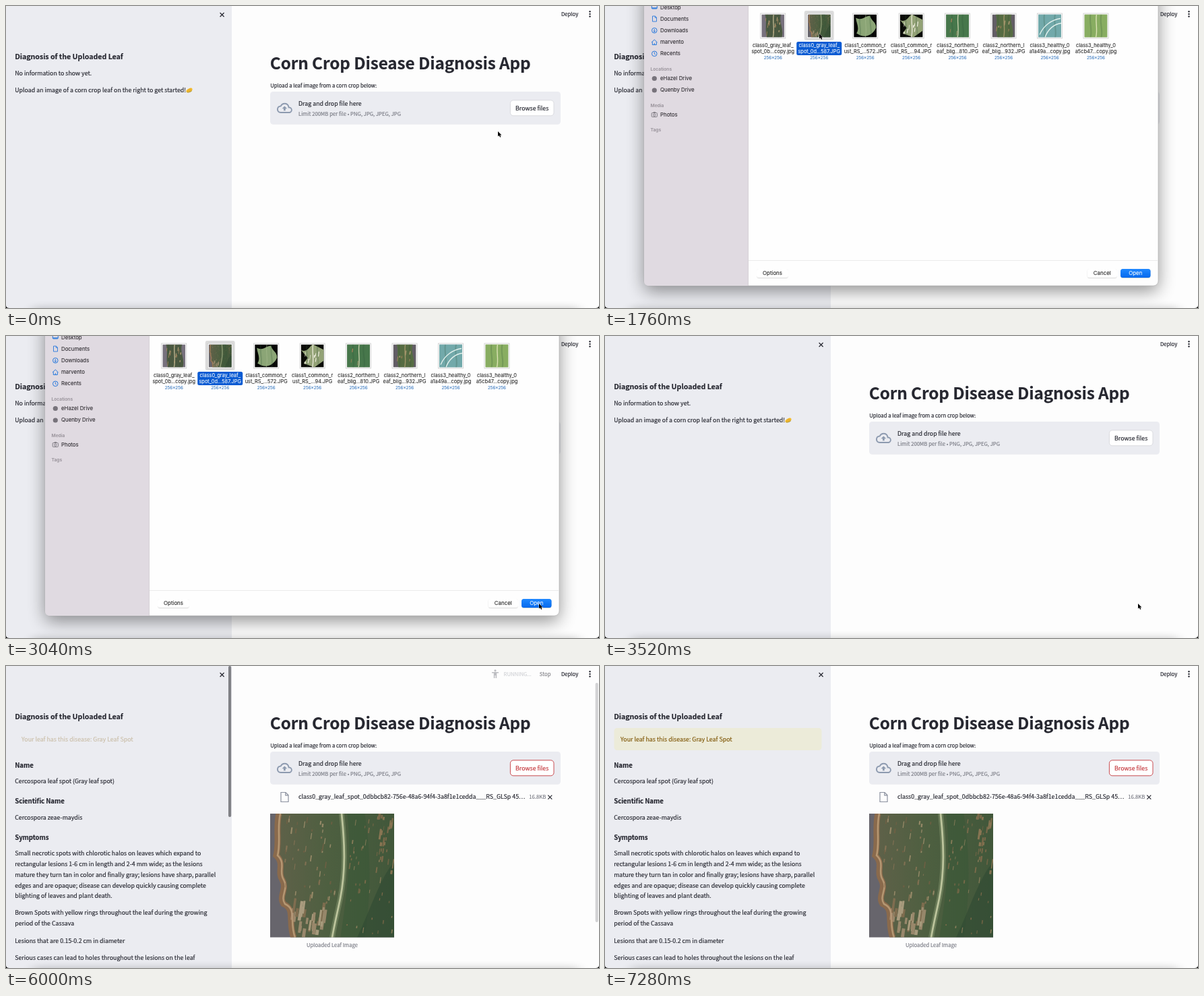
An HTML page that plays this animation: 880x448 px, repeating every 7360 ms.

```html
<!DOCTYPE html>
<html lang="en">
<head>
<meta charset="utf-8">
<title>Crop diagnosis demo</title>
<style>
html, body { margin: 0; width: 100%; height: 100%; overflow: hidden; background: #fdfdfd; }
svg { display: block; }
text {
  font-family: "Noto Sans CJK JP", "Noto Sans CJK SC", "Noto Sans CJK", "Open Sans", sans-serif;
  white-space: pre; fill: currentColor; stroke: currentColor; stroke-width: .18;
}
#dialog text { font-family: Inter, Roboto, sans-serif; stroke-width: .08; }
.line { fill: none; stroke-width: 1; }
</style>
</head>
<body>
<script>
const INK = '#262730', RED = '#c4383d', BODY = 8.84, SMALL = 7.72, LOOP = 7360;

const text = (x, y, size, str, color = INK, more = '') =>
  `<text x="${x}" y="${y}" font-size="${size}" color="${color}" ${more}>${str}</text>`;
const bold = (x, y, size, str) =>
  text(x, y, size, str, INK, 'font-weight="700" letter-spacing="-.005em"');
const rect = (x, y, w, h, fill, r = 0, more = '') =>
  `<rect x="${x}" y="${y}" width="${w}" height="${h}" rx="${r}" fill="${fill}" ${more}/>`;
const path = (d, stroke, width = 1, fill = 'none', more = '') =>
  `<path d="${d}" stroke="${stroke}" stroke-width="${width}" fill="${fill}" ${more}/>`;
const group = (id, body) => `<g id="${id}">${body}</g>`;
const cross = (x, y, r) => path(`M${x - r} ${y - r}l${2 * r} ${2 * r}m0 ${-2 * r}l${-2 * r} ${2 * r}`, INK, 1.2);

function random(seed) {
  return () => (seed = seed * 16807 % 2147483647) / 2147483647;
}

// Short slanted lesions scattered over a box
function spots(seed, count, x, y, w, h, size, colors) {
  const rnd = random(seed);
  let out = '';
  for (let i = 0; i < count; i++) {
    const px = x + rnd() * w, py = y + rnd() * h, len = size * (.3 + rnd());
    out += path(`M${px.toFixed(1)} ${py.toFixed(1)}l${(len * .14).toFixed(1)} ${(-len).toFixed(1)}`,
      colors[i % colors.length], (size * (.12 + rnd() * .16)).toFixed(1));
  }
  return out;
}

function photo() {
  const edge = 'M13 0C8 20 14 42 9 62C22 74 10 86 18 98C26 112 12 122 20 134C38 142 26 160 35 184';
  const rib = 'M106 0C111 46 112 86 104 126C99 150 95 166 92 184';
  return rect(0, 0, 184, 184, '#67656c') + '<g filter="url(#blur)">' +
    path(edge + 'H186V0Z', 'none', 0, 'url(#leaf)') +
    path('M114 -2C122 60 114 120 104 186H140C150 120 150 60 140 -2Z', 'none', 0, '#3a5838', 'opacity=".55"') +
    path('M128 186C150 140 165 90 186 70V186Z', 'none', 0, '#2f4a32', 'opacity=".6"') +
    path(edge, '#8a6a4c', 9) + path(edge, '#b59772', 2.5, 'none', 'transform="translate(2 0)"') +
    '<g opacity=".72">' +
    spots(71, 34, 32, 144, 48, 40, 18, ['#b3977a', '#8f7254', '#c9b394']) +
    spots(19, 50, 22, 10, 74, 125, 8, ['#94795a', '#b09a76', '#766044']) +
    spots(45, 46, 114, 8, 68, 172, 7, ['#927250', '#a58b66', '#7d6848']) +
    spots(8, 20, 160, 4, 22, 90, 13, ['#a3805c', '#907050']) + '</g>' +
    path(rib, '#7c8d66', 8, 'none', 'opacity=".6"') + path(rib, '#bcc49c', 2.8) + '</g>';
}

// [background, leaf colour, leaf outline, rib colour, lesion count]
const blob = 'M3 5C12 10 17 2 24 2C26 10 34 12 33 20C27 32 16 36 4 28C9 20 4 14 3 5Z';
const full = 'M0 0H34V34H0Z';
const band = 'M5 0H29C25 12 34 22 30 34H8C4 22 9 10 5 0Z';
const looks = [
  ['#77717d', '#4b5941', band, '#b7b08c', 12],
  null,
  ['#050605', '#8ba576', blob, '#a9bc91', 0],
  ['#0b0c08', '#93a276', 'M0 8C10 14 14 0 18 0L34 8V24L20 34L4 28L10 20Z', '#e5e5d2', 9],
  ['#6b7f62', '#47774b', full, '#c6cfaa', 3],
  ['#625d65', '#566c43', band, '#9f9569', 6],
  ['#4b8795', '#72a9aa', full, '#e2f0ec', 0],
  ['#789d55', '#88ad61', full, '#dbe3b4', 0]
];
const names = [
  'class0_gray_leaf_|spot_0b...copy.jpg', 'class0_gray_leaf_|spot_0d...587.JPG',
  'class1_common_r|ust_RS_...572.JPG', 'class1_common_r|ust_RS_...94.JPG',
  'class2_northern_l|eaf_blig...810.JPG', 'class2_northern_l|eaf_blig...932.JPG',
  'class3_healthy_0|a1a49a...copy.jpg', 'class3_healthy_0|a5cb47...copy.jpg'
];

function picture(i) {
  if (!looks[i]) return '<g transform="scale(.185)">' + photo() + '</g>';
  const [back, leaf, shape, rib, count] = looks[i];
  const vein = i === 6 ? 'M2 30C8 16 20 8 33 6M10 34C14 22 24 14 34 13' : 'M18 0C16 12 20 22 17 34';
  return rect(0, 0, 34, 34, back) + path(shape, 'none', 0, leaf) +
    path('M25 0C22 12 28 24 25 34M9 0C7 12 12 24 9 34', '#2c4f34', 2, 'none', 'opacity=".22"') +
    path(vein, rib, i === 2 ? .6 : 1.4) +
    spots(31 + i * 7, count, 6, 8, 22, 25, 6, i === 3 ? ['#f0eee0'] : ['#a5835c', '#b39c74']);
}

function fileItem(i) {
  const cx = 249.3 + i * 68.45, [a, b] = names[i].split('|');
  const label = color => text(cx, 60.7, 7.4, a, color, 'text-anchor="middle"') +
    text(cx, 70.4, 7.4, b, color, 'text-anchor="middle"');
  const chosen = i === 1 ? group('chosen', rect(cx - 22, 7, 44, 44, '#dcdcdc', 3) +
    rect(cx - 33.5, 53, 67, 20, '#0a5bd3', 2.5) + label('#fff')) : '';
  return label('#272727') + chosen + rect(cx - 18.5, 11, 37, 37, '#fff', 0, 'stroke="#c4c4c4" stroke-width=".7"') +
    `<svg x="${cx - 17}" y="12.5" width="34" height="34">${picture(i)}</svg>` +
    text(cx, 79.2, 6.3, '256×256', '#2f72bd', 'text-anchor="middle"');
}

function dialog() {
  const blue = '#2678dc', gray = '#77737b';
  const places = [['Desktop', 2], ['Documents', 19], ['Downloads', 36], ['marvento', 53.5], ['Recents', 70.5],
    ['eHazel Drive', 107], ['Quenby Drive', 124.5], ['Photos', 161]];
  const heads = [['Locations', 93], ['Media', 147], ['Tags', 183.5]];
  const button = (x, w, label, fill, ink) =>
    rect(x, 390, w, 13, fill, 3.5, 'filter="url(#lift)"') + text(x + w / 2, 399.3, 7.9, label, ink, 'text-anchor="middle"');
  return rect(58, -30, 763, 445, '#000', 8, 'filter="url(#shade)" opacity=".42"') +
    rect(58, -30, 763, 445, '#fefefe', 7, 'stroke="#aaa" stroke-width=".6"') +
    path('M212.5 -30V415H65Q58 415 58 408V-30Z', 'none', 0, '#e0dae1') +
    path('M212.5 0V415', '#cfc9d0', .8) + path('M213 377.5H821', '#e6e6e6', .8) +
    places.map(([s, y]) => text(82, y + 2.8, 7.85, s, '#2d2a2f')).join('') +
    heads.map(([s, y]) => text(67.5, y + 2.5, 6.7, s, '#9a949c', 'font-weight="600"')).join('') +
    rect(69.3, -2, 8, 6, 'none', 1, `stroke="${blue}"`) + path('M69.5 3H77', blue, 1.4) +
    path('M70.5 15H74.5L76.5 17V23H70.5ZM74.3 15V17.3H76.5', blue, .9) +
    `<g class="line" stroke="${blue}"><circle cx="73.3" cy="36.3" r="3.8"/><circle cx="73.3" cy="70.8" r="3.8"/></g>` +
    path('M73.3 34V38.4M71.5 36.8L73.3 38.5L75.1 36.8M73.3 68.3V71L75 72', blue, .9) +
    path('M69 54L73.3 50L77.6 54M70.3 53.5V57.5H76.3V53.5M73.3 55V57.5', blue, 1) +
    [107.5, 125].map(y => `<circle cx="73.3" cy="${y}" r="3.6" fill="${gray}"/>`).join('') +
    rect(69.2, 158.5, 8.2, 6, 'none', 1, `stroke="${gray}" stroke-width=".9"`) +
    `<circle class="line" cx="73.3" cy="161.6" r="1.6" stroke="${gray}"/>` + path('M71.7 157.7H75', gray, 1) +
    names.map((_, i) => fileItem(i)).join('') +
    button(225, 47, 'Options', '#fff', '#222') + button(715.5, 44.5, 'Cancel', '#fff', '#222') +
    button(765, 44.5, 'Open', 'url(#blue)', '#fff') +
    group('press', rect(765, 390, 44.5, 13, '#003a9c', 3.5, 'opacity=".3"'));
}

const lines = (rows, x = 13.2) => rows.map(([y, s]) => text(x, y, BODY, s)).join('');

function sidebarEmpty() {
  return lines([[102.6, 'No information to show yet.'],
    [128, 'Upload an image of a corn crop leaf on the right to get started!']]) +
    '<g transform="translate(272 125) rotate(-28)"><ellipse rx="5" ry="2.5" fill="#f3bd31"/>' +
    path('M-4.5 .5Q-1 3.8 3 2.4', '#b59b38', 1) + path('M-2 -1H3M-2 .8H3', '#d99522', .5) + '</g>';
}

function sidebarResult() {
  const alert = group('alert', rect(13.5, 92, 308, 33, '#ecebd9', 4.5, 'id="alertBack"') +
    text(23, 112, BODY, 'Your leaf has this disease: Gray Leaf Spot', '#80590a'));
  return alert + bold(13.2, 150.8, 9.65, 'Name') + bold(13.2, 204.2, 9.65, 'Scientific Name') +
    bold(13.2, 257.6, 9.65, 'Symptoms') + lines([
      [174.4, 'Cercospora leaf spot (Gray leaf spot)'],
      [228, 'Cercospora zeae-maydis'],
      [281.4, 'Small necrotic spots with chlorotic halos on leaves which expand to'],
      [297.1, 'rectangular lesions 1-6 cm in length and 2-4 mm wide; as the lesions'],
      [312.8, 'mature they turn tan in color and finally gray; lesions have sharp, parallel'],
      [328.5, 'edges and are opaque; disease can develop quickly causing complete'],
      [344.2, 'blighting of leaves and plant death.'],
      [369.4, 'Brown Spots with yellow rings throughout the leaf during the growing'],
      [385.2, 'period of the Cassava'],
      [410.8, 'Lesions that are 0.15-0.2 cm in diameter'],
      [436.3, 'Serious cases can lead to holes throughout the lesions on the leaf']
    ]);
}

function uploader() {
  const cloud = 'M19.35 10.04A7.49 7.49 0 0 0 12 4C9.11 4 6.6 5.64 5.35 8.04A6 6 0 0 0 0 14c0 3.31 2.69 6 6 6h13c2.76 0 5-2.24 5-5 0-2.64-2.05-4.78-4.65-4.96zM19 18H6a4 4 0 0 1-.44-7.97l1.07-.11.5-.95A5.47 5.47 0 0 1 17.39 10.43l.3 1.5 1.53.11A2.98 2.98 0 0 1 19 18zM8 13h2.55v3h2.9v-3H16l-4-4z';
  return bold(391.8, 94, 24.33, 'Corn Crop Disease Diagnosis App') +
    text(392.2, 120.6, SMALL, 'Upload a leaf image from a corn crop below:') +
    rect(392, 127, 431, 48.7, '#ebecf1', 4.5) +
    path(cloud, 'none', 0, '#8d9aaf', 'transform="translate(402 140) scale(.95)"') +
    text(434, 148.4, BODY, 'Drag and drop file here') +
    text(434, 163.4, SMALL, 'Limit 200MB per file • PNG, JPG, JPEG, JPG', '#7c7e87') +
    rect(748.4, 139.8, 64.6, 23, '#fff', 4.5, 'id="browse" stroke-width=".9"') +
    text(780.7, 155, BODY, 'Browse files', INK, 'id="browseText" text-anchor="middle"') +
    group('file', path('M408 187.5H415L419 191.5V201.5H408ZM414.8 187.7V191.8H419', '#8b919f', 1.2) +
      text(434, 197.4, BODY, 'class0_gray_leaf_spot_0dbbcb82-756e-48a6-94f4-3a8f1e1cedda___RS_GLSp 45…') +
      text(776.3, 197, SMALL, '16.8KB', '#7c7e87') + cross(807.3, 194.7, 3));
}

document.body.innerHTML = `<svg width="880" height="448" viewBox="0 0 880 448"><defs>
  <linearGradient id="leaf"><stop stop-color="#5f6149"/><stop offset=".45" stop-color="#4d5f40"/><stop offset="1" stop-color="#41573a"/></linearGradient>
  <linearGradient id="blue" x2="0" y2="1"><stop stop-color="#2389ff"/><stop offset="1" stop-color="#0069ed"/></linearGradient>
  <filter id="shade" x="-10%" y="-10%" width="120%" height="125%"><feOffset dy="8"/><feGaussianBlur stdDeviation="13"/></filter>
  <filter id="soft" x="-10%" y="-300%" width="120%" height="700%"><feGaussianBlur stdDeviation="9 6"/></filter>
  <filter id="blur"><feGaussianBlur stdDeviation=".7"/></filter>
  <filter id="lift" x="-10%" y="-20%" width="120%" height="150%"><feDropShadow dx="0" dy=".4" stdDeviation=".6" flood-opacity=".35"/></filter>
  </defs>` +
  rect(0, 0, 880, 448, '#fdfdfd') + rect(0, 0, 335, 448, '#ebecf1') + cross(320.6, 13, 3) +
  text(824, 15, SMALL, 'Deploy') + [8.3, 11.9, 15.5].map(y => `<circle cx="866.5" cy="${y}" r="1.2" fill="${INK}"/>`).join('') +
  group('running',
    group('chair', '<circle cx="728" cy="7.3" r="1.6" fill="#8b8c94"/>' +
      path('M727 9.5L725 13H729L731 17M726.5 11L730 11.5M724 12A3 3 0 1 0 728 16', '#8b8c94', 1.3)) +
    group('person', '<circle cx="726" cy="6.8" r="1.6" fill="#8b8c94"/>' +
      path('M721 9.7H731M726 9V14M724.6 10V18M727.4 10V18', '#8b8c94', 1.6)) +
    text(738.5, 15, SMALL, 'RUNNING...', '#aeb0b7') + text(791.8, 15, SMALL, 'Stop')) +
  group('stale', bold(13.2, 78.6, 10.7, 'Diagnosis of the Uploaded Leaf') +
    group('empty', sidebarEmpty()) + uploader()) +
  group('result', sidebarResult() + `<svg x="392" y="219" width="184" height="183.5">${photo()}</svg>` +
    text(484, 417, SMALL, 'Uploaded Leaf Image', '#7c7e87', 'text-anchor="middle"')) +
  group('bars', rect(330, 0, 4.2, 224, '#808186', 2) + rect(874.6, 25, 4.2, 355, '#d2d2d4', 2)) +
  rect(40, 448, 810, 12, '#000', 0, 'filter="url(#soft)" opacity=".22"') +
  group('dialog', dialog()) +
  path('M0 444Q0 448 5 448H0ZM880 444Q880 448 875 448H880Z', 'none', 0, '#000') +
  group('cursor', path('M0 0V7.6L1.8 6L3.1 8.8L4.4 8.2L3.2 5.5H5.5Z', '#fff', .7, '#000', 'paint-order="stroke"')) +
  '</svg>';

const $ = id => document.getElementById(id);
const alpha = (id, v) => $(id).setAttribute('opacity', v);
const ramp = (t, a, b) => Math.min(1, Math.max(0, (t - a) / (b - a)));
const between = (t, a, b) => +(t >= a && t < b);

// [time, x, y] of the pointer tip
const route = [[0, 730, 186], [80, 730, 186], [520, 778, 152], [880, 778, 152], [1520, 318, 41], [2240, 318, 41],
  [2880, 791, 397], [4720, 791, 397], [5000, 796, 347], [5200, 796, 347], [5440, 818, 338], [5800, 886, 310], [LOOP, 886, 310]];

function pointer(t) {
  const i = route.findIndex(p => p[0] > t), a = route[i - 1], b = route[i];
  const u = ramp(t, a[0], b[0]), e = u * u * (3 - 2 * u);
  return `translate(${a[1] + (b[1] - a[1]) * e} ${a[2] + (b[2] - a[2]) * e})`;
}

function draw(t) {
  const done = between(t, 5760, LOOP), red = t >= 3920 || between(t, 440, 800);
  $('cursor').setAttribute('transform', pointer(t));
  alpha('dialog', ramp(t, 720, 880) * (1 - ramp(t, 3200, 3360)));
  alpha('chosen', +(t >= 1600));
  alpha('press', between(t, 3080, 3200));
  alpha('file', +(t >= 3920));
  alpha('stale', done ? 1 : 1 - .67 * ramp(t, 4300, 5300) ** 1.6);
  alpha('empty', 1 - done);
  alpha('result', done);
  alpha('alert', ramp(t, 5860, 6320));
  alpha('alertBack', ramp(t, 5980, 6320));
  alpha('running', between(t, 3920, LOOP) * (1 - ramp(t, 5840, 6200)));
  const chair = Math.floor(t / 320) % 2;
  alpha('chair', chair);
  alpha('person', 1 - chair);
  alpha('bars', done * (1 - ramp(t, 6320, 6640)));
  $('browse').setAttribute('stroke', red ? RED : '#d6d7dc');
  $('browseText').setAttribute('color', red ? RED : INK);
}

const start = performance.now();
function tick() {
  draw((performance.now() - start) % LOOP);
  requestAnimationFrame(tick);
}
tick();
</script>
</body>
</html>
```
